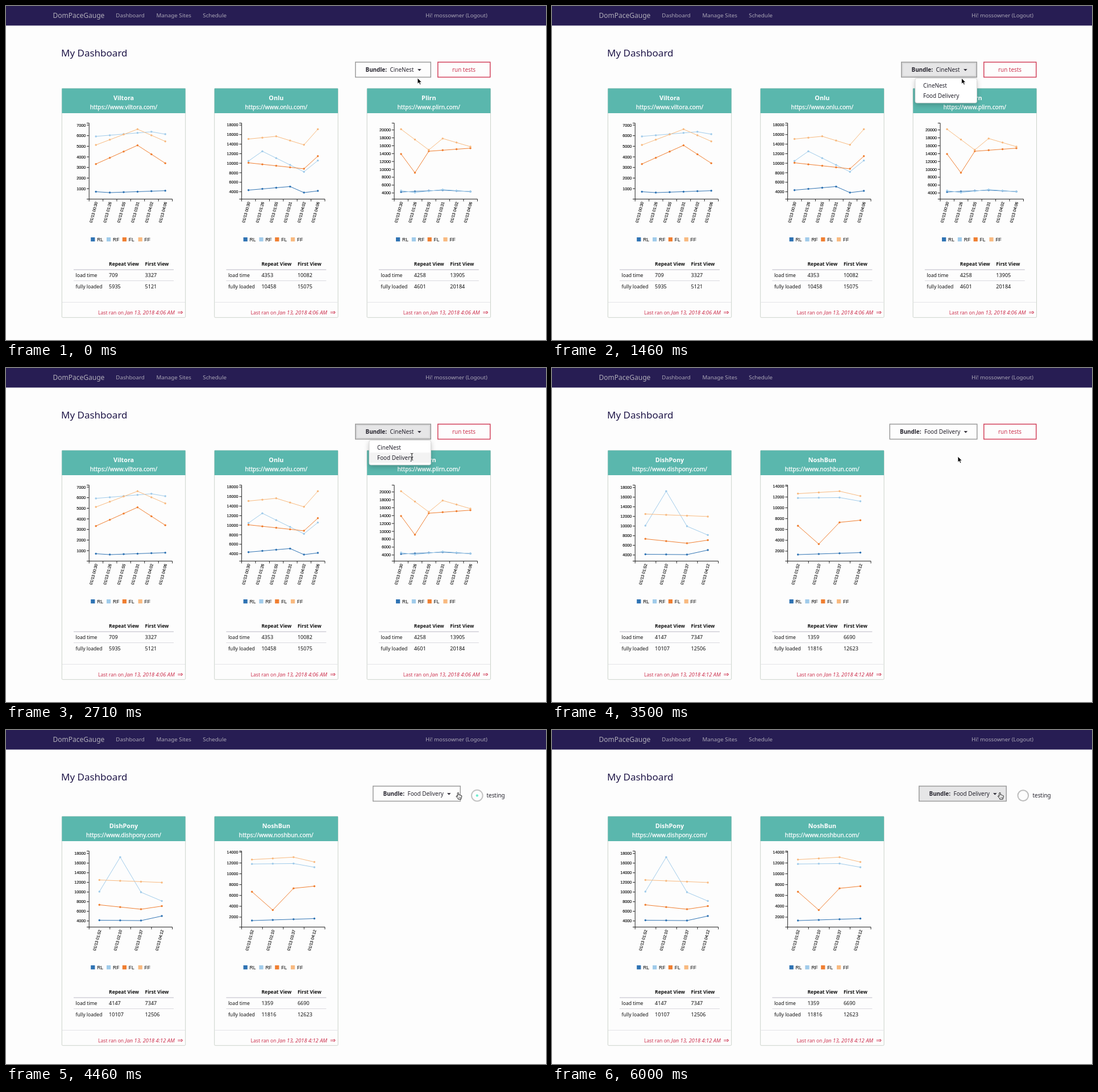
Animation of 950x589 px, one loop 6.04 s. Source, as an HTML page:

```html
<!DOCTYPE html>
<html lang="en">
<head>
<meta charset="utf-8">
<title>Dashboard</title>
<style>
  html, body { margin: 0; width: 100%; height: 100%; overflow: hidden; background: #fdfdfd; }
  svg { display: block; font-family: "Noto Sans", "Open Sans", sans-serif; }
  text { white-space: pre; }
  .nav { font-size: 9.75px; fill: #aaa6b6; }
  .brand { font-size: 12px; fill: #b0adb9; }
  .heading { font-size: 17px; fill: #1f1648; }
  .btn { font-size: 9.9px; fill: #24222c; }
  .bold { font-weight: bold; }
  .red { fill: #cd3450; }
  .title { font-size: 10.8px; font-weight: bold; fill: #fff; text-anchor: middle; }
  .url { font-size: 10.2px; fill: #fff; stroke: #fff; stroke-width: .25px; text-anchor: middle; }
  .axis { font: 7.2px "Liberation Sans", Arial, sans-serif; text-anchor: end; stroke: #000; stroke-width: .12px; }
  .legend { font: 8.5px "Liberation Sans", Arial, sans-serif; }
  .cell { font-size: 8.6px; fill: #111; }
  .num { font-size: 9.1px; fill: #111; }
  .foot { font-size: 8.65px; fill: #cd3450; }
  .date { font-size: 9.3px; font-style: italic; fill: #cd3450; }
  .arrow { font: 12px "DejaVu Sans", sans-serif; fill: #cd3450; }
  #menu rect:first-child { filter: drop-shadow(0 3px 4px rgba(0, 0, 0, .22)); }
</style>
</head>
<body>
<svg id="stage" width="950" height="589" viewBox="0 0 950 589"></svg>
<script>
const LOOP = 6040, PRESS = 620, OPEN = 760, PICK = 2800, RUN = 4420, SPIN = 1600;
const COLORS = ["#2f73b3", "#a0cbea", "#f07f31", "#f8ba80"];
const KEYS = ["RL", "RF", "FL", "FF"];
const stage = document.getElementById("stage");

function el(tag, attrs, parent = stage, content) {
  const node = document.createElementNS("http://www.w3.org/2000/svg", tag);
  set(node, attrs);
  if (content !== undefined) node.textContent = content;
  parent.append(node);
  return node;
}
function set(node, attrs) { for (const k in attrs) node.setAttribute(k, attrs[k]); }
const group = (parent = stage, attrs = {}) => el("g", attrs, parent);
const text = (p, x, y, cls, str) => el("text", { x, y, class: cls }, p, str);
const rect = (p, x, y, width, height, fill, more) => el("rect", { x, y, width, height, fill, ...more }, p);
const path = (p, d, stroke, width = 1) => el("path", { d, stroke, "stroke-width": width, fill: "none" }, p);
const show = (node, on) => node.setAttribute("visibility", on ? "visible" : "hidden");

// Place on a polyline through [position, ...values] stops
function along(stops, at) {
  const i = Math.max(1, stops.findIndex(s => s[0] >= at));
  const [a, ...from] = stops[i - 1], [b, ...to] = stops[i];
  const p = (at - a) / (b - a);
  return { p, from, to };
}
const mix = (a, b, p) => a + (b - a) * p;

// Straight runs from start to end, bent at the given [index, value] turns
function trend(count, [start, end, ...turns]) {
  const stops = [[0, start], ...turns, [count - 1, end]];
  return Array.from({ length: count }, (_, i) => {
    const { p, from, to } = along(stops, i);
    return mix(from[0], to[0], p);
  });
}

// The data always span the same height; tick labels follow from their range
function chart(g, times, series) {
  const all = series.flat(), min = Math.min(...all), max = Math.max(...all);
  const step = max - min < 8000 ? 1000 : 2000;
  const slot = 146.4 / times.length;
  const px = i => 146 + slot * (i + .5);
  const py = v => 217.3 + (max - v) / (max - min) * 111.8;
  let d = "M142 206.5H146.2V340.5M142 340.5H292.6V344.5";
  for (let v = step; py(v) > 206; v += step) {
    if (py(v) > 340) continue;
    d += `M142 ${py(v)}H146`;
    text(g, 140.2, py(v) + 2.5, "axis", v);
  }
  times.forEach((time, i) => {
    d += `M${146.2 + slot * i} 340.5v4`;
    const label = text(g, 0, 0, "axis", "01/13 " + time);
    set(label, { transform: `translate(${px(i) + 3.2} 346) rotate(-75)` });
  });
  path(g, d, "#222");
  series.forEach((values, s) => {
    path(g, "M" + values.map((v, i) => px(i) + " " + py(v)).join("L"), COLORS[s]);
    values.forEach((v, i) => el("circle", { cx: px(i), cy: py(v), r: 1.75, fill: COLORS[s] }, g));
  });
}

function card(parent, col, name, times, trends) {
  const g = group(parent, { transform: `translate(${col * 268.4} 0)` });
  const series = trends.map(t => trend(times.length, t));
  rect(g, 98.3, 145.3, 217.4, 404, "#fdfdfd", { stroke: "#cbd2ca", rx: 1.5 });
  rect(g, 98.4, 145.4, 217.2, 43.6, "#5ab7ad");
  text(g, 207, 165.5, "title", name);
  text(g, 207, 181.7, "url", `https://www.${name.toLowerCase()}.com/`);
  chart(g, times, series);

  KEYS.forEach((key, i) => {
    const x = 149.2 + i * 27.8;
    rect(g, x, 408, 7.2, 7.2, COLORS[i]);
    text(g, x + 11, 414.8, "legend", key);
  });

  const [rl, rf, fl, ff] = series.map(s => s[0]);
  text(g, 181, 458, "cell bold", "Repeat View");
  text(g, 244.5, 458, "cell bold", "First View");
  path(g, "M119 465H295", "#bcb9c6", 1.2);
  [["load time", rl, fl], ["fully loaded", rf, ff]].forEach((row, i) => {
    const y = 478.2 + i * 19.3;
    text(g, 122.5, y, "cell", row[0]);
    text(g, 181, y, "num", row[1]);
    text(g, 244.5, y, "num", row[2]);
  });
  path(g, "M119 484.5H295", "#dad9df");
  path(g, "M99 522.5H315", "#e4e4e8");
  const ran = times.at(-1).replace(/^0/, "");
  text(g, 162, 543.6, "foot", "Last ran on");
  text(g, 210, 543.6, "date", `Jan 13, 2018 ${ran} AM`);
  text(g, 301.6, 544.4, "arrow", "⇒");
}

// Page header
rect(stage, 0, 0, 950, 34.5, "#271d53");
text(stage, 82.5, 20.7, "brand", "DomPaceGauge");
text(stage, 193.3, 20, "nav", "Dashboard");
text(stage, 264.5, 20, "nav", "Manage Sites");
text(stage, 346.3, 20, "nav", "Schedule");
set(text(stage, 847, 20, "nav", "Hi! mossowner (Logout)"), { "text-anchor": "end" });
text(stage, 97, 89, "heading", "My Dashboard");

// Cards of the two bundles; trends in the order of KEYS
const tv = group(), food = group();
const tvTimes = ["00:30", "01:26", "01:55", "03:31", "04:02", "04:06"];
const foodTimes = ["01:52", "02:10", "03:37", "04:12"];
card(tv, 0, "Viltora", tvTimes, [
  [709, 807, [1, 625]], [5935, 6140, [4, 6370]],
  [3327, 3400, [3, 5090]], [5121, 5465, [3, 6610]]]);
card(tv, 1, "Onlu", tvTimes, [
  [4353, 4180, [3, 5100], [4, 3825]], [10458, 10560, [1, 12500], [4, 8195]],
  [10082, 11470, [4, 8825]], [15075, 17130, [2, 15640], [4, 13850]]]);
card(tv, 2, "Plirn", tvTimes, [
  [4258, 4360, [3, 4720]], [4601, 4360, [1, 4100], [3, 4870]],
  [13905, 15370, [1, 9140], [2, 14600]], [20184, 15760, [2, 14930], [3, 17830]]]);
card(food, 0, "DishPony", foodTimes, [
  [4147, 5020, [2, 4080]], [10107, 8140, [1, 17235], [2, 9965]],
  [7347, 7080, [2, 6435]], [12506, 11990]]);
card(food, 1, "NoshBun", foodTimes, [
  [1359, 1730], [11816, 11215, [2, 11900]],
  [6690, 7715, [1, 3310], [2, 7320]], [12623, 12180, [2, 13070]]]);

// Bundle button, drawn from its left edge
const bundle = group();
const face = rect(bundle, .75, 99, 0, 26.5, "#fdfdfd", { "stroke-width": 1.5 });
const inset = rect(bundle, 2.5, 100.8, 0, 23, "none", { stroke: "#000", "stroke-opacity": .05, "stroke-width": 2.5 });
text(bundle, 18.5, 115.6, "btn bold", "Bundle:");
const choice = text(bundle, 61.5, 115.6, "btn", "");
const caret = el("path", { d: "M-24 111.2h6.6l-3.3 3.4z", fill: "#24222c" }, bundle);

const run = group();
const runFace = rect(run, 759.75, 99, 92, 26.5, "#fdfdfd", { stroke: "#d2425c", "stroke-width": 1.5 });
text(run, 785, 115.6, "btn red", "run tests");

const testing = group();
text(testing, 845.5, 118.6, "btn", "testing");
const rings = ["#6ceed0", "#808080"].map(stroke =>
  el("circle", { cx: 828.8, cy: 115.6, fill: "none", stroke, "stroke-width": 2 }, testing));

const menu = group(stage, { id: "menu" });
rect(menu, 638.9, 127.5, 108.6, 43.5, "#fff", { rx: 3, stroke: "#cfcfcf", "stroke-width": .8 });
const mark = rect(menu, 639.3, 0, 107.8, 18, "#f3f3f3");
text(menu, 653, 143.8, "btn", "CineNest");
text(menu, 653, 161.6, "btn", "Food Delivery");

// Pointers, with their hot spot at 0,0
const cursors = { arrow: group(), hand: group(), beam: group() };
el("path", { d: "M0 0V10.2L2.4 8 4.1 11.8 5.8 11 4.2 7.4H7.3Z", fill: "#000", stroke: "#fff", "stroke-width": .8 }, cursors.arrow);
el("path", {
  d: "M-1.2 .9Q-1.2-.2-.1-.2T1 .9V4.2Q1.9 3.4 2.8 4.3 3.8 3.7 4.5 4.8 6.2 4.4 6.3 6.2 6.3 8.4 5.2 9.6V11.4H-.3V10.2L-3.3 6.8Q-3.6 5.2-2.2 5.6L-1.2 6.7Z",
  fill: "#fff", stroke: "#111", "stroke-linejoin": "round"
}, cursors.hand);
path(cursors.hand, "M1.2 7V9.6M2.7 7V9.6M4.2 7V9.6", "#333", .6);
const beamShape = "M-2.2-5.5Q0-5.5 0-4V5Q0 6.3-2.2 6.3M2.2-5.5Q0-5.5 0-4M0 5Q0 6.3 2.2 6.3M-1.3 2.6H1.3";
path(cursors.beam, beamShape, "#fff", 2);
path(cursors.beam, beamShape, "#111");

// Pointer rests: [time, x, y]
const route = [
  [0, 724, 127], [320, 722.5, 118.7], [1150, 722.5, 118.7],
  [2150, 714, 156], [3600, 714, 156],
  [4050, 795.5, 110.6], [5450, 795.5, 110.6],
  [5900, 788, 110.6], [LOOP, 788, 110.6]
];
function pointer(t) {
  const { p, from, to } = along(route, t);
  return from.map((v, k) => mix(v, to[k], p * p * (3 - 2 * p)));
}

function bezier(x1, y1, x2, y2, x) {
  const at = (a, b, u) => 3 * a * u * (1 - u) ** 2 + 3 * b * u * u * (1 - u) + u ** 3;
  let lo = 0, hi = 1;
  for (let i = 0; i < 20; i++) {
    const mid = (lo + hi) / 2;
    if (at(x1, x2, mid) < x) lo = mid; else hi = mid;
  }
  return at(y1, y2, lo);
}

function render(t) {
  const picked = t >= PICK, busy = t >= RUN, open = t >= OPEN && t < PICK;
  const left = busy ? 645 : picked ? 593.5 : 614;
  const width = picked ? 155 : 134;
  const [x, y] = pointer(t);
  const inRow = y > 98.5 && y < 126;
  const onBundle = inRow && x > left && x < left + width;
  const onRun = !busy && inRow && x > 760 && x < 852;
  const pressed = t >= PRESS && t < OPEN;
  const lit = onBundle && !(busy && t < RUN + 80);

  show(tv, !picked);
  show(food, picked);
  set(food, { transform: `translate(0 ${busy ? 7 : 0})` });

  set(bundle, { transform: `translate(${left} 0)` });
  set(face, {
    width: width - 1.5,
    fill: pressed || open && lit ? "#d3d3d3" : open || lit ? "#e6e6e7" : "#fdfdfd",
    stroke: "#9c9c9c"
  });
  set(inset, { width: width - 5 });
  show(inset, pressed || open);
  choice.textContent = picked ? "Food Delivery" : "CineNest";
  set(caret, { transform: `translate(${width} 0)` });

  show(run, !busy);
  set(runFace, { fill: onRun ? "#e6e6e6" : "#fdfdfd" });
  show(testing, busy);
  rings.forEach((ring, i) => {
    const p = (Math.max(0, t - RUN) / SPIN + i / 2) % 1;
    set(ring, { r: 14.6 * bezier(0, .2, .8, 1, p), opacity: 1 - bezier(.2, 0, .8, 1, p) });
  });

  show(menu, open);
  const onItem = open && y > 131;
  show(mark, onItem);
  set(mark, { y: y < 149.3 ? 131.3 : 149.3 });

  const kind = onBundle || onRun ? "hand" : onItem ? "beam" : "arrow";
  for (const k in cursors) {
    show(cursors[k], k === kind);
    set(cursors[k], { transform: `translate(${x} ${y})` });
  }
}

const start = performance.now();
function tick() {
  render((performance.now() - start) % LOOP);
  requestAnimationFrame(tick);
}
tick();
</script>
</body>
</html>
```
